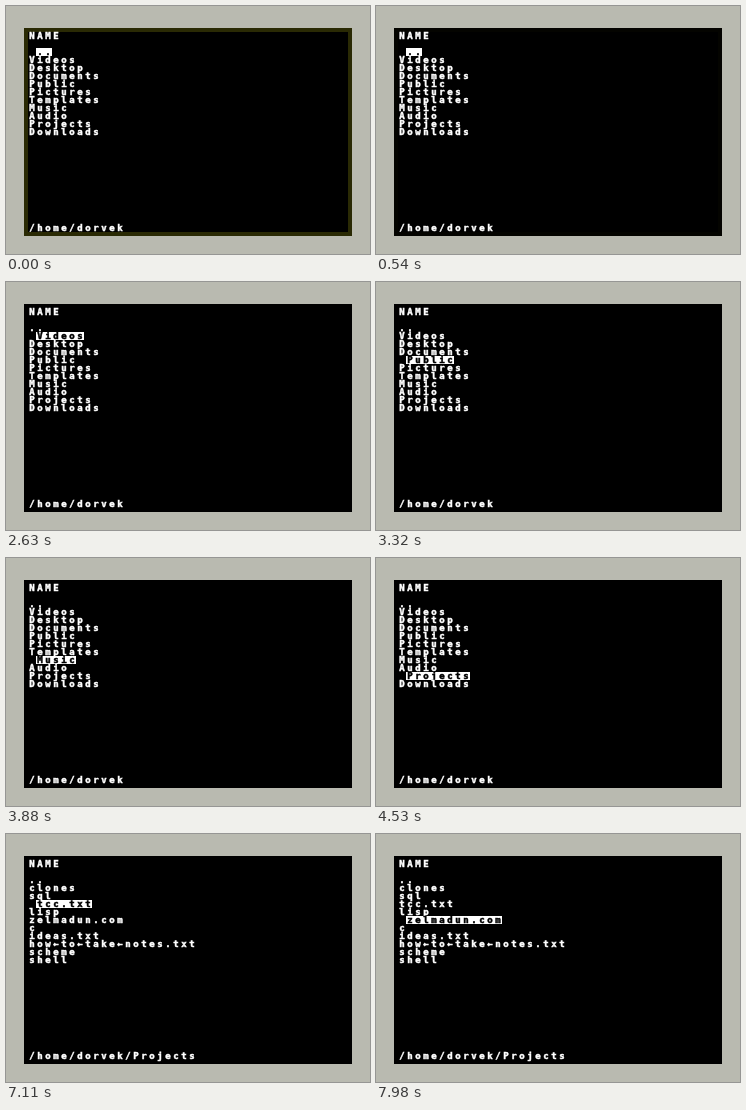
An HTML page for the animation above (8 s loop, 364 by 248 pixels).

```html
<!DOCTYPE html>
<html lang="en">
<head>
<meta charset="utf-8">
<title>File list</title>
<style>
html, body { margin: 0; width: 100%; height: 100%; overflow: hidden; background: #b9bab0; }
svg { display: block; }
text {
  font: bold 9px "DejaVu Sans Mono", "Noto Sans Mono", monospace;
  text-anchor: middle;
  color: #fff;
  fill: currentColor;
  stroke: currentColor;
  stroke-width: 0.5px;
}
rect { shape-rendering: crispEdges; }
</style>
</head>
<body>
<svg width="364" height="248" viewBox="0 0 364 248">
  <rect width="364" height="248" fill="#b9bab0"/>
  <rect id="edge" x="18" y="22" width="328" height="208" fill="#2a2a04"/>
  <rect x="22" y="26" width="320" height="200" fill="#000"/>
  <rect id="bar" height="8" fill="#fff"/>
  <g id="lines"></g>
</svg>
<script>
const NS = "http://www.w3.org/2000/svg";
const LOOP = 8000, CELL = 8, LEFT = 22, TOP = 26;
const FIRST_ROW = 2, PATH_ROW = 24;
const OPEN_AT = 5190, FADE_FROM = 20, FADE_TO = 780;

const home = {
  path: "/home/dorvek",
  items: ["..", "Videos", "Desktop", "Documents", "Public", "Pictures",
    "Templates", "Music", "Audio", "Projects", "Downloads"],
  // evenly repeated key presses
  moves: Array.from({ length: 9 }, (_, i) => 2630 + 205 * i)
};
const projects = {
  path: "/home/dorvek/Projects",
  items: ["..", "clones", "sql", "tcc.txt", "lisp", "zelmadun.com", "c",
    "ideas.txt", "how←to←take←notes.txt", "scheme", "shell"],
  moves: [5890, 6500, 6830, 7290, 7680]
};

const byId = id => document.getElementById(id);
const edge = byId("edge"), bar = byId("bar"), lines = byId("lines");

function addLine(row) {
  const el = document.createElementNS(NS, "text");
  el.setAttribute("y", TOP + row * CELL + 7);
  lines.append(el);
  return el;
}

// Each character sits in the middle of its own cell.
function write(el, str, col, color) {
  const xs = [...str].map((_, i) => LEFT + (col + i + 0.5) * CELL);
  el.setAttribute("x", xs.join(" "));
  el.style.color = color;
  el.textContent = str;
}

const title = addLine(0);
const rows = home.items.map((_, i) => addLine(FIRST_ROW + i));
const pathLine = addLine(PATH_ROW);
write(title, "NAME", 0, "#fff");

let shown = "";

function showList(dir, pick) {
  const key = dir.path + pick;
  if (key === shown) return;
  shown = key;
  dir.items.forEach((name, i) => {
    const on = i === pick;
    write(rows[i], name, on ? 1 : 0, on ? "#000" : "#fff");
  });
  write(pathLine, dir.path, 0, "#fff");
  bar.setAttribute("x", LEFT + CELL);
  bar.setAttribute("y", TOP + (FIRST_ROW + pick) * CELL);
  bar.setAttribute("width", dir.items[pick].length * CELL);
}

function render(t) {
  const p = Math.min(1, Math.max(0, (t - FADE_FROM) / (FADE_TO - FADE_FROM)));
  const glow = (1 - p) ** 2;
  const rgb = [42, 42, 4].map(v => Math.round(v * glow));
  edge.setAttribute("fill", `rgb(${rgb})`);

  const dir = t < OPEN_AT ? home : projects;
  showList(dir, dir.moves.filter(at => t >= at).length);
}

const start = performance.now();
function tick() {
  render((performance.now() - start) % LOOP);
  requestAnimationFrame(tick);
}
tick();
</script>
</body>
</html>
```
